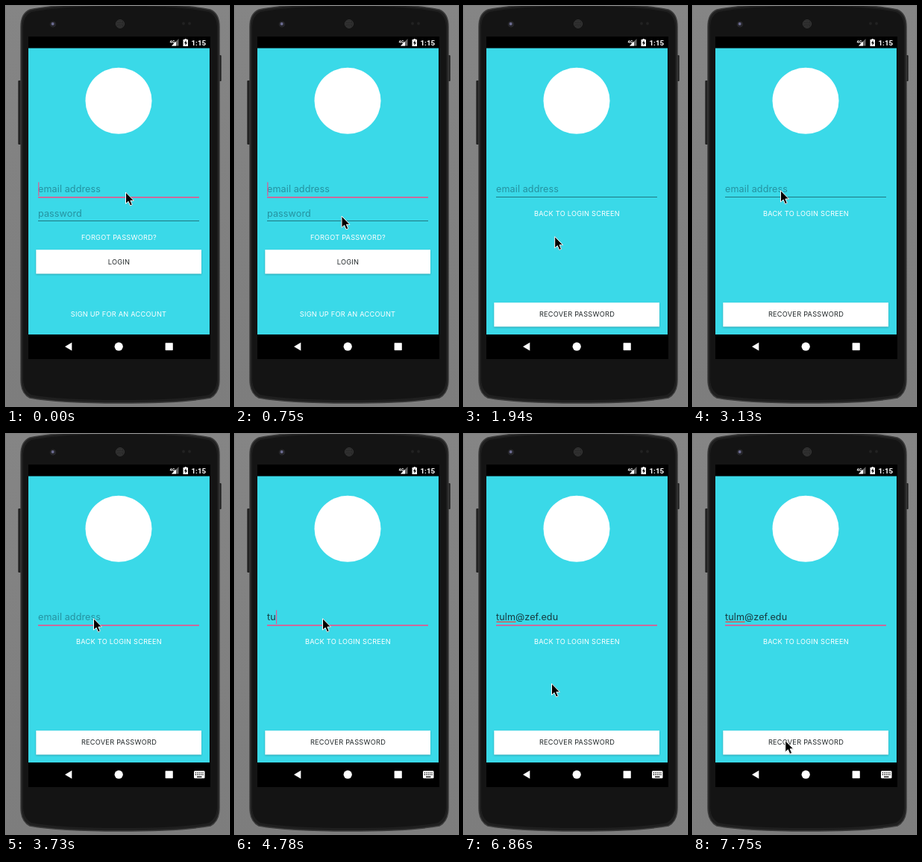
Recreate the animation shown at these times as an HTML page. Size 299x537 px, loop 8000 ms.

```html
<!DOCTYPE html>
<html lang="en">
<head>
<meta charset="utf-8">
<title>Password recovery</title>
<style>
  html, body { margin: 0; width: 100%; height: 100%; overflow: hidden; background: #828282; }
  svg { display: block; width: 100%; height: 100%; }
  text { font-family: Inter, "Open Sans", sans-serif; font-weight: 400; }
  .caps { font-size: 9.2px; letter-spacing: .25px; fill: #fff; text-anchor: middle; }
  .dark { fill: #22282a; }
  .field { font-size: 12.6px; letter-spacing: .1px; fill: #173a40; }
  .hint { fill: #2592a0; }
  .rule { fill: #1f7782; }
  .pink { fill: #e4588f; }
  .button { fill: #fff; filter: drop-shadow(0 1px 1px rgba(0, 0, 0, .25)); }
  #pointer { filter: drop-shadow(0 .7px .7px rgba(0, 0, 0, .4)); }
</style>
</head>
<body>
<svg viewBox="0 0 299 537">
  <defs>
    <linearGradient id="backdrop" x2="0" y2="1">
      <stop offset="0" stop-color="#858585"/>
      <stop offset="1" stop-color="#7d7d7d"/>
    </linearGradient>
  </defs>

  <g id="phone">
    <rect width="299" height="537" fill="url(#backdrop)"/>
    <rect x="16.3" y="100" width="4" height="86" rx="1" fill="#222"/>
    <rect x="284.7" y="66" width="4" height="35" rx="1" fill="#222"/>
    <path d="M20 28Q20 10 32 5Q70 -3 153 -3Q236 -3 274 5Q286 10 286 28V502Q286 520 274 526Q236 533 153 533Q70 533 32 526Q20 520 20 502Z"
      fill="#1f1f1f" stroke="#3a3a3a" stroke-width="1.5"/>
    <path d="M23 30Q23 13 34 8Q72 0 153 0Q234 0 272 8Q283 13 283 30V500Q283 516 272 522Q234 529 153 529Q72 529 34 522Q23 516 23 500Z" fill="#141414"/>
    <circle cx="63" cy="24.5" r="3.6" fill="#222226" stroke="#2c2c30"/>
    <circle cx="62.7" cy="24" r="2" fill="#6c6c90"/>
    <circle cx="153" cy="24" r="5.5" fill="#292929" stroke="#383838"/>
    <path d="M150 21h6M149 24h8M150 27h6" stroke="#444" stroke-dasharray="1 1"/>
    <circle cx="238" cy="23.5" r="2" fill="#222"/>
    <circle cx="246" cy="23.5" r="2" fill="#222"/>
    <rect x="30" y="41" width="244" height="433"/>
    <rect x="30" y="56.6" width="243" height="384.4" fill="#3ad9e8"/>
  </g>

  <g id="system-bars" fill="#fff">
    <text x="219.5" y="49.5" style="font:700 5.5px Roboto,sans-serif">4G</text>
    <path d="M222 53.5L231.5 44V53.5Z" fill="#666"/>
    <path d="M222 53.5L228 47.5V53.5Z"/>
    <path d="M237.5 45h2v-1h2.5v1h2v9h-6.5Z"/>
    <path d="M241.5 46l-2.5 4h1.5v3l2.5-4h-1.5Z" fill="#000"/>
    <text x="248.5" y="52.5" style="font:700 9.8px Roboto,sans-serif">1:15</text>
    <path d="M79 457.2L88.3 451.7V462.7Z"/>
    <circle cx="151.2" cy="457.2" r="5.6"/>
    <rect x="213.6" y="452.2" width="10.2" height="10" rx=".6"/>
    <g id="keyboard">
      <rect x="252" y="452.3" width="14.5" height="10" rx="1.2"/>
      <path d="M253.7 454.8H265M253.7 457.3H265" stroke="#000" stroke-width="1.3" stroke-dasharray="1.3 1.1"/>
      <path d="M256 460.3h6.5" stroke="#000" stroke-width="1.3"/>
    </g>
  </g>

  <circle cx="151" cy="127.3" r="44.5" fill="#fff"/>

  <g id="login">
    <text class="field hint" x="43" y="282.5">password</text>
    <rect class="rule" x="43" y="288" width="216" height="1"/>
    <text class="caps" x="151.5" y="314.2">FORGOT PASSWORD?</text>
    <rect class="button" x="40.3" y="327.2" width="221.7" height="32.3"/>
    <text class="caps dark" x="151.5" y="346.7">LOGIN</text>
    <text class="caps" x="151" y="417.4">SIGN UP FOR AN ACCOUNT</text>
  </g>

  <g id="recover">
    <text class="caps" x="151.5" y="281.9">BACK TO LOGIN SCREEN</text>
    <rect class="button" x="40.3" y="398.2" width="221.7" height="32.3"/>
    <text class="caps dark" x="151.5" y="417.4">RECOVER PASSWORD</text>
  </g>

  <text class="field hint" id="hint" x="43" y="250.3">email address</text>
  <text class="field" id="typed" x="43" y="250.3"></text>
  <rect id="spelling" x="43.5" y="251.6" height="1.3" fill="#ee4540"/>
  <rect class="rule" id="rule" x="43" y="256" width="216" height="1"/>
  <rect class="pink" id="focus" x="43" y="256" width="216" height="1.7"/>
  <rect class="pink" id="caret" y="236.5" width="1.2" height="18.5"/>

  <path id="pointer" d="M0 0V15.5L3.6 12.3 6 18 8.8 16.8 6.4 11.3H11Z" stroke="#fff" stroke-linejoin="round"/>
</svg>

<script>
const LOOP = 8000, SCREEN_CHANGE = 1940, REFOCUS = 3280;
const EMAIL = "tulm@zef.edu";

// [start time, value], each held until the next
const pointerSteps = [
  [0, [160.5, 250]], [150, [160.5, 252]],
  [600, [157, 261]], [750, [143, 282]], [900, [128, 301]], [1040, [121.7, 309.5]],
  [2690, [121, 302]], [2840, [120, 283]], [2990, [118, 259]], [3130, [117.5, 247.7]],
  [6710, [117.5, 282]], [6860, [117.5, 335]], [7010, [118, 371]],
  [7150, [121, 396]], [7300, [123, 408]], [7450, [123.8, 411.5]]
];
const typingSteps = [
  [0, 0], [4780, 2], [4920, 3], [5220, 4], [5520, 5], [5670, 6],
  [5820, 8], [5960, 9], [6110, 11], [6260, 12]
];
const caretSteps = [
  [0, true], [150, false], [600, true], [1190, false], [1640, true], [SCREEN_CHANGE, false],
  [REFOCUS, true], [3730, false], [4330, true], [6760, false], [7300, true], [7750, false]
];

const el = id => document.getElementById(id);
const show = (id, visible) => { el(id).style.display = visible ? "" : "none"; };
const valueAt = (steps, t) => steps.findLast(([start]) => start <= t)[1];

function draw(t) {
  const recovering = t >= SCREEN_CHANGE;
  const refocused = t >= REFOCUS;
  const focused = !recovering || refocused;
  const count = valueAt(typingSteps, t);
  const typed = el("typed");

  show("login", !recovering);
  show("recover", recovering);
  show("keyboard", refocused);
  show("focus", focused);
  show("rule", !focused);
  show("hint", count === 0);
  show("caret", valueAt(caretSteps, t));
  show("spelling", count > 4);

  typed.textContent = EMAIL.slice(0, count);
  const width = count ? typed.getComputedTextLength() : 0;
  el("caret").setAttribute("x", 43.2 + width);
  if (count > 4) el("spelling").setAttribute("width", typed.getSubStringLength(0, 4));
  el("pointer").setAttribute("transform", `translate(${valueAt(pointerSteps, t)})`);
}

function tick() {
  draw(performance.now() % LOOP);
  requestAnimationFrame(tick);
}
tick();
</script>
</body>
</html>
```
